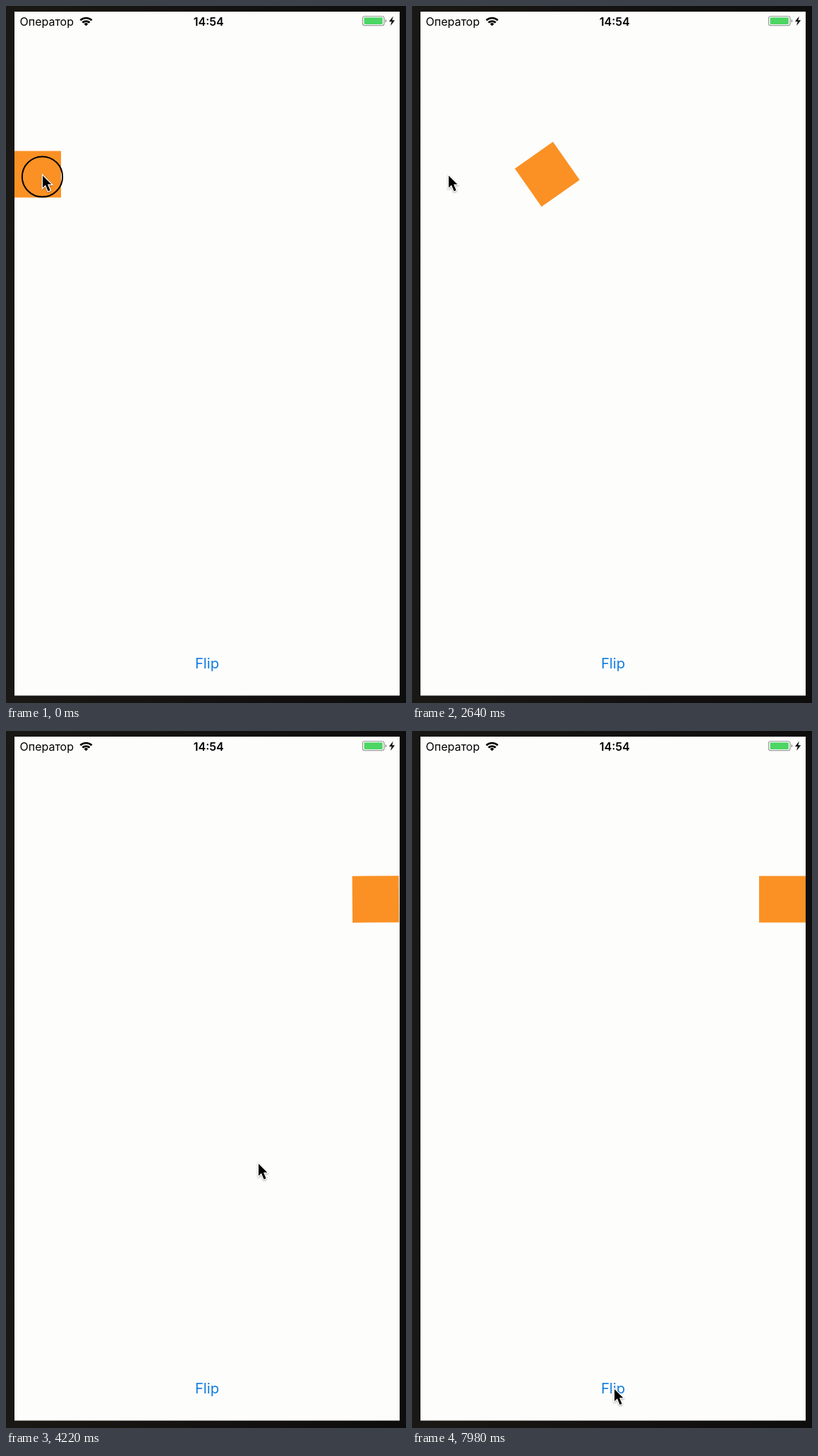
Write an HTML page that moves like this. It is 567 px wide and 988 px high and loops after 8 s.

```html
<!DOCTYPE html>
<html lang="ru">
<head>
<meta charset="utf-8">
<title>Flip</title>
<style>
  html, body { margin: 0; width: 100%; height: 100%; overflow: hidden; background: #14120f; }
  svg { display: block; }
  text { font-family: Inter, Roboto, sans-serif; font-size: 16px; fill: #000; }
  .time { font-weight: 600; text-anchor: middle; }
  .flip { font-size: 20.3px; fill: #147de0; text-anchor: middle; }
  #cursor { filter: drop-shadow(0 1.5px 1.2px rgba(0, 0, 0, .35)); }
</style>
</head>
<body>
<svg width="567" height="988" viewBox="0 0 567 988">
  <defs>
    <linearGradient id="bezel">
      <stop offset="0" stop-color="#1a1814"/>
      <stop offset="1" stop-color="#0e0d0d"/>
    </linearGradient>
    <clipPath id="screen"><rect x="12" y="8" width="546" height="969.5"/></clipPath>
  </defs>
  <rect width="567" height="988" fill="url(#bezel)"/>
  <g clip-path="url(#screen)">
    <rect x="12" y="8" width="546" height="970" fill="#fdfdfc"/>

    <text x="19.5" y="27.5">Оператор</text>
    <g fill="none" stroke="#000" stroke-width="2.7">
      <path d="M105.4 20.3a11.6 11.6 0 0 1 16.2 0"/>
      <path d="M108.4 23.6a7.4 7.4 0 0 1 10.2 0"/>
    </g>
    <path d="M113.5 28.3l-2.8-2.9a4.1 4.1 0 0 1 5.6 0z"/>
    <text class="time" x="287.3" y="27.5">14:54</text>

    <rect x="505.5" y="14.5" width="30.5" height="13.2" rx="3" fill="none" stroke="#9b9b9b" stroke-width="1.2"/>
    <rect x="507.6" y="16.3" width="26.2" height="9.6" rx="1.3" fill="#4cd663"/>
    <path d="M537.5 18.8q2 .6 2 2.3t-2 2.3z" fill="#9b9b9b"/>
    <path d="M548.8 14.6l-5.8 7.5h3.7l-1.6 5.9 6-7.8h-3.8z"/>

    <text class="flip" x="285" y="938.8">Flip</text>

    <rect id="square" x="-33" y="-33" width="66" height="66" fill="#fb9124"/>
    <circle id="touch" cx="51.5" cy="242" r="28.6" fill="none" stroke="#000" stroke-width="2"/>
    <path id="cursor" d="M0 0V17L4 13.3 7.6 22 10.6 20.7 7 12.2H12.3z"
      stroke="#fff" stroke-width="2.4" paint-order="stroke"/>
  </g>
</svg>
<script>
  const LOOP = 8000;
  const RELEASE = 33, FLIP_STEPS = 60;
  // step, x, y of the pointer tip
  const pointerKeys = [
    [0, 52, 240.5], [60, 52, 240.5], [84, 358, 613.5], [92, 358, 613.5],
    [104, 370, 614.5], [147, 370, 614.5], [165, 287, 933], [172, 287, 933]
  ];
  const square = document.getElementById('square');
  const touch = document.getElementById('touch');
  const cursor = document.getElementById('cursor');

  const clamp = v => Math.min(1, Math.max(0, v));
  const smooth = u => u * u * (3 - 2 * u);

  // cubic-bezier(.42, 0, .58, 1)
  function easeInOut(u) {
    let lo = 0, hi = 1;
    for (let i = 0; i < 30; i++) {
      const s = (lo + hi) / 2, r = 1 - s;
      const x = 3 * r * r * s * 0.42 + 3 * r * s * s * 0.58 + s * s * s;
      if (x < u) lo = s; else hi = s;
    }
    return u <= 0 ? 0 : u >= 1 ? 1 : smooth(lo);
  }

  // Three evenly spaced poses are held for 20, 100 and 20 ms.
  function stepAt(ms) {
    const rest = ms % 140;
    return Math.floor(ms / 140) * 3 + (rest >= 20) + (rest >= 120);
  }

  function pointerAt(step) {
    const i = pointerKeys.findIndex(k => k[0] > step);
    const [s0, x0, y0] = pointerKeys[i - 1], [s1, x1, y1] = pointerKeys[i];
    const p = smooth((step - s0) / (s1 - s0));
    return [x0 + (x1 - x0) * p, y0 + (y1 - y0) * p];
  }

  function draw(ms) {
    const step = stepAt(ms);
    const p = easeInOut(clamp((step - RELEASE) / FLIP_STEPS));
    square.setAttribute('transform', `translate(${45 + 480 * p} 238.5) rotate(${180 * p})`);
    touch.setAttribute('visibility', step < RELEASE ? 'visible' : 'hidden');
    cursor.setAttribute('transform', `translate(${pointerAt(step)})`);
  }

  const start = performance.now();
  function tick() {
    draw((performance.now() - start) % LOOP);
    requestAnimationFrame(tick);
  }
  tick();
</script>
</body>
</html>
```
